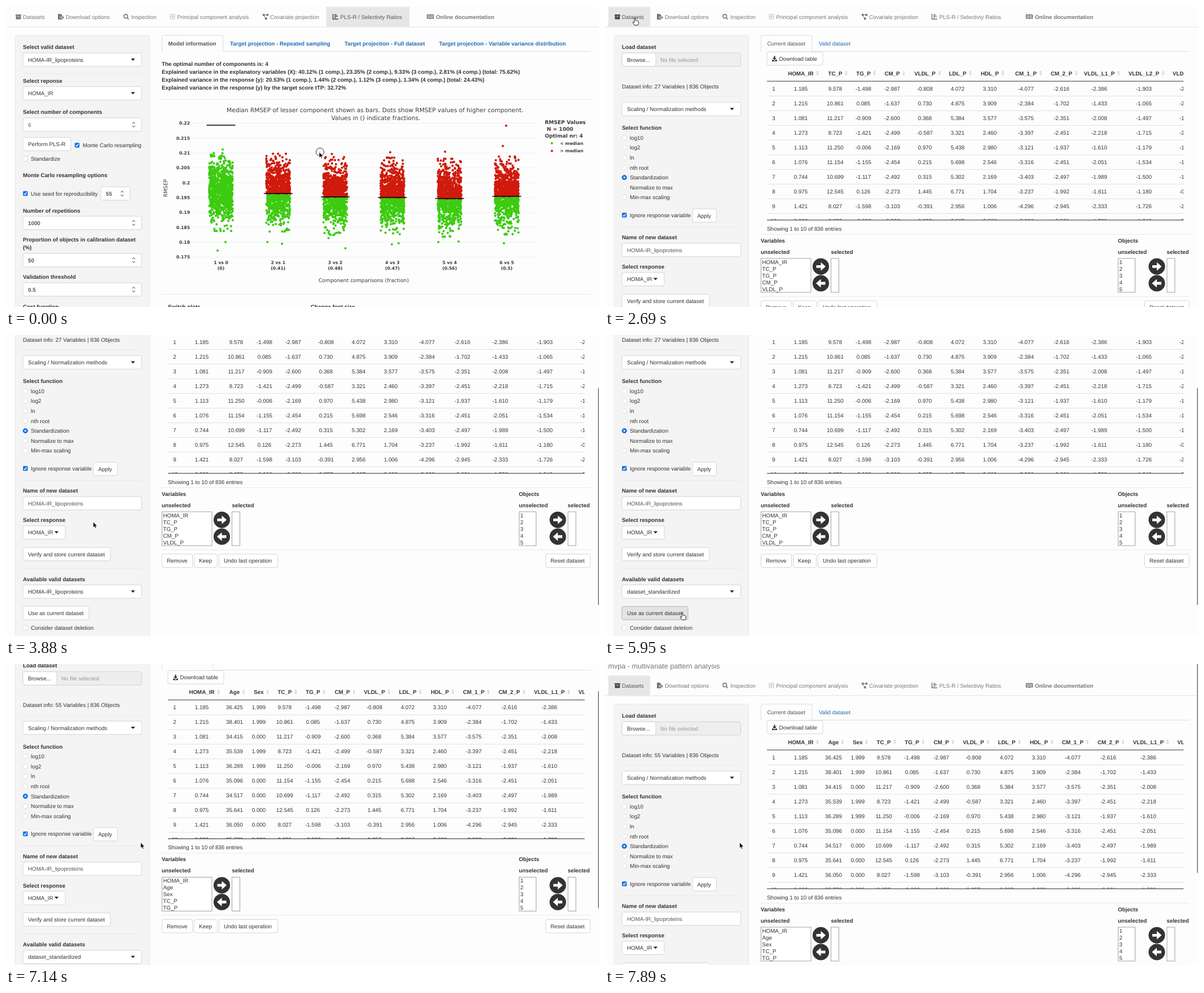
Write an HTML page that moves like this. It is 1051 px wide and 533 px high and loops after 8000 ms.

```html
<!DOCTYPE html>
<html lang="en">
<head>
<meta charset="utf-8">
<title>mvpa</title>
<style>
html, body { margin: 0; width: 100%; height: 100%; overflow: hidden; background: #fdfdfd; }
svg { display: block; width: 1051px; height: 533px; }
text { font: 9.8px "Liberation Sans", Arial, sans-serif; fill: #333; text-rendering: geometricPrecision; white-space: pre; }
.b { font-weight: bold; }
.m { text-anchor: middle; }
.nav { fill: #777; }
.on { fill: #555; }
.link { fill: #1f6db5; }
.field { fill: #555; }
.mute { fill: #999; }
.inv { fill: #fff; }
.plot text { font-family: "DejaVu Sans", Verdana, sans-serif; fill: #3a3a3a; }
.plot .tick { font-size: 7.7px; font-weight: bold; }
.plot .axis { font-size: 9.2px; }
.plot .title { font-size: 10.6px; }
.plot .legend { font-size: 9.1px; font-weight: bold; }
.end { text-anchor: end; }
</style>
</head>
<body>
<svg id="stage" viewBox="0 0 1051 533" xmlns="http://www.w3.org/2000/svg"></svg>
<script>
const FRAME = 148.8, LOOP = 8000;
const GREEN = '#3ccb10', RED = '#cf1a0c';
const range = n => [...Array(n).keys()];
const join = list => list.join('');

// Text is placed by the vertical centre of its capitals.
const text = (x, y, s, cls = '', extra = '') =>
  `<text x="${x}" y="${y}" dy=".36em" class="${cls}" ${extra}>${s.replace(/</g, '&lt;').replace(/>/g, '&gt;')}</text>`;
const bold = (x, y, s, cls = '') => text(x, y, s, 'b ' + cls);
const rect = (x, y, w, h, fill, stroke = 'none', r = 0, extra = '') =>
  `<rect x="${x}" y="${y}" width="${w}" height="${h}" rx="${r}" fill="${fill}" stroke="${stroke}" stroke-width=".8" ${extra}/>`;
const path = (d, fill = 'none', stroke = 'none', w = 1, extra = '') =>
  `<path d="${d}" fill="${fill}" stroke="${stroke}" stroke-width="${w}" ${extra}/>`;
const rule = (x1, x2, y, color = '#e9e9e9', w = 1) => path(`M${x1} ${y}H${x2}`, 'none', color, w);
const at = (x, y, body, extra = '') => `<g transform="translate(${x} ${y})" ${extra}>${body}</g>`;
const caret = (x, y) => path(`M${x - 3.7} ${y - 2}h7.4l-3.7 4z`, '#222');
const box = (x, w, y, fill = '#fff') => rect(x, y - 11.8, w, 23.6, fill, '#ccc', 2.8);
const button = (x, w, y, label, tx = x + 9) => box(x, w, y) + text(tx, y, label);
const select = (y, label, cls = '') => box(30, 210.5, y) + text(39, y, label, cls) + caret(225, y);
const number = (x, w, y, value, cls) => box(x, w, y) + text(x + 9, y, value, 'field ' + cls) +
  path(`M${x + w - 16.5} ${y - 1.6}l2.3-3 2.3 3m-4.6 3.4l2.3 3 2.3-3`, 'none', '#444', 1);
const check = (x, y, on) => on
  ? rect(x - 4.2, y - 4.2, 8.4, 8.4, '#1173e6', 'none', 1.6) + path(`M${x - 2.2} ${y}l1.6 2 3-4.2`, 'none', '#fff', 1.3)
  : rect(x - 4.2, y - 4.2, 8.4, 8.4, '#fff', '#d4d4d4', 1.6);
const radio = (y, on) => `<circle cx="34.3" cy="${y}" r="4.2" fill="${on ? '#1173e6' : '#fff'}" stroke="${on ? '#1173e6' : '#d4d4d4'}" stroke-width=".8"/>` +
  (on ? `<circle cx="34.3" cy="${y}" r="1.6" fill="#fff"/>` : '');
const tabs = width => rule(276, 1036, 80.3, '#ddd') +
  path(`M276.5 80.8V55q0-3 3-3h${width - 6}q3 0 3 3V80.8`, '#fdfdfd', '#ddd');
const sidebar = rect(16.5, 52, 238, 760, '#f4f4f4', '#e3e3e3', 3);

const ICONS = {
  archive: path('M-5-4H5v2.4H-5zM-4.4-1H4.4V4.4H-4.4zM-1.5 0v1h3v-1z', 'currentColor', 'none', 0, 'fill-rule="evenodd"'),
  export: path('M-5-5H0L2.5-2.5V5H-5z', 'currentColor') + path('M-2 1.3H4.6M2.6-.9L5 1.3 2.6 3.5', 'none', '#fdfdfd', 2.6) +
    path('M-2 1.3H5M3-.9L5.2 1.3 3 3.5', 'none', 'currentColor', 1.2),
  search: path('M1.7 1.7L4.6 4.6M2.6-.8a3.3 3.3 0 1 1-6.6 0a3.3 3.3 0 1 1 6.6 0', 'none', 'currentColor', 1.6),
  table: path('M-4-4H4V4H-4zM-4 0H4M0-4V4', 'none', '#aaa', 1, 'stroke-dasharray="1.4 .6"'),
  diagram: path('M-5-5h3.6v3.6H-5zM1.6-5h3.6v3.6H1.6zM-1 1.6h3.6v3.6H-1z', 'currentColor') + path('M-2-3.2H2M-3-2L0 2.6', 'none', 'currentColor', 1),
  chart: path('M-4.5-5V4.2H5', 'none', 'currentColor', 1.5) + path('M-2-3.5H2M-2-1H4M-2 1.5H1', 'none', 'currentColor', 1.3),
  book: path('M-5.5-3.4Q-2.5-4.6 0-3Q2.5-4.6 5.5-3.4V3.2Q2.5 2 0 3.6Q-2.5 2-5.5 3.2z', '#ddd', '#444', 1) + path('M0-3V4M-4-1.5h2.6M-4 .5h2.6M1.4-1.5H4M1.4.5H4', 'none', '#555', .8)
};
const NAV = [['archive', 22, 30, 'Datasets'], ['export', 97, 106, 'Download options'], ['search', 213, 222, 'Inspection'],
  ['table', 295, 303.5, 'Principal component analysis'], ['diagram', 460, 468, 'Covariate projection'],
  ['chart', 584, 592.5, 'PLS-R / Selectivty Ratios'], ['book', 752, 762, 'Online documentation']];
const nav = (active, x, w) => rule(0, 1051, 37, '#e2e2e2') + rect(x, 1.5, w, 35.3, '#e6e6e6') +
  join(NAV.map(([icon, ix, tx, label], i) => `<g ${i ? '' : 'class="first"'}>` +
    at(ix, 19, ICONS[icon], `color="${i === active ? '#444' : '#777'}"`) +
    text(tx, 19, label, (i === active ? 'on' : 'nav') + (i === 6 ? ' b' : '')) + '</g>'));

// Model page
function scatter() {
  let seed = 7;
  const random = () => (seed = (seed * 16807) % 2147483647) / 2147483647;
  const normal = () => Math.sqrt(-2 * Math.log(random())) * Math.cos(2 * Math.PI * random());
  const lines = [211, 332, 338, 339, 341, 337];
  const strays = [[3, 254, 8, 418, -6, 433], [3, 265, -19, 418, 7, 421], [-6, 262, 18, 429, -12, 411],
    [-4, 259, -1, 422, 11, 420], [-8, 258, -35, 418, 16, 417], [-1, 212, -7, 248, -5, 420]];
  let green = '', red = '', bars = '';
  lines.forEach((line, i) => {
    const cx = 381 + 101.3 * i, mean = i ? line - 4 : 327;
    const dot = (x, y) => {
      const d = `M${(cx + x).toFixed(1)} ${y.toFixed(1)}h0`;
      if (i && y < line) red += d; else green += d;
    };
    range(1000).forEach(() => dot((random() - .5) * 42, mean + 25.5 * Math.max(-2.6, Math.min(2.8, normal()))));
    range(3).forEach(n => dot(Math.max(-20, strays[i][2 * n]), strays[i][2 * n + 1]));
    bars += rule(cx - 25.5, cx + 25.5, line, '#000', 1.6);
  });
  const round = 'stroke-linecap="round"';
  return path(green, 'none', GREEN, 4.2, round) + path(red, 'none', RED, 4.2, round) + bars;
}
const ticks = ['0.22', '0.215', '0.21', '0.205', '0.2', '0.195', '0.19', '0.185', '0.18', '0.175'];
const shares = ['0', '0.41', '0.48', '0.47', '0.56', '0.5'];
const plot = `<g class="plot">` +
  join(ticks.map((s, i) => rule(330, 942, 207.5 + 26.35 * i, '#eee', .8) + text(326, 207.5 + 26.35 * i, s, 'tick end'))) +
  scatter() +
  text(654, 184.5, 'Median RMSEP of lesser component shown as bars. Dots show RMSEP values of higher component.', 'title m') +
  text(655.5, 198.5, 'Values in () indicate fractions.', 'title m') +
  join(shares.map((s, i) => text(381 + 101.3 * i, 454, `${i + 1} vs ${i}`, 'tick m') + text(381 + 101.3 * i, 464, `(${s})`, 'tick m'))) +
  text(634, 485.5, 'Component comparisons (fraction)', 'axis m') +
  at(283, 322.5, text(0, 0, 'RMSEP', 'axis m', 'transform="rotate(-90)"')) +
  text(955, 206, 'RMSEP Values', 'legend') + text(958.5, 218, 'N = 1000', 'legend') + text(955, 230, 'Optimal nr: 4', 'legend') +
  `<circle cx="967.5" cy="243" r="2.1" fill="${GREEN}"/><circle cx="967.5" cy="256.5" r="2.1" fill="${RED}"/>` +
  text(982, 243, '< median', 'tick') + text(982, 256.5, '> median', 'tick') + '</g>';

const modelPage = nav(5, 567.5, 147.5) + sidebar +
  bold(30, 72, 'Select valid dataset') + select(95, 'HOMA-IR_lipoproteins') +
  rule(30, 241, 120) + bold(30, 132, 'Select reponse') + select(154.5, 'HOMA_IR') +
  bold(30, 187.5, 'Select number of components') + number(30, 210.5, 210, '6', '') +
  button(30, 85, 244.5, 'Perform PLS-R') + check(126, 246.5, true) + text(136, 246.5, 'Monte Carlo resampling') +
  check(34.3, 270.5, false) + text(44, 270.5, 'Standardize') +
  bold(30, 299, 'Monte Carlo resampling options') +
  check(34.3, 332, true) + text(44, 332, 'Use seed for reproducibility') + number(168, 52, 332, '55', 'b') +
  bold(30, 362, 'Number of repetitions') + number(30, 210.5, 384, '1000', 'b') +
  bold(30, 413.5, 'Proportion of objects in calibration dataset') + bold(30, 427.5, '(%)') + number(30, 210.5, 450, '50', 'b') +
  bold(30, 479.5, 'Validation threshold') + number(30, 210.5, 502, '0.5', 'b') + bold(30, 532, 'Cost function') +
  tabs(108) + bold(287.5, 66, 'Model information', 'on') + bold(397, 66, 'Target projection - Repeated sampling', 'link') +
  bold(600, 66, 'Target projection - Full dataset', 'link') + bold(767.5, 66, 'Target projection - Variable variance distribution', 'link') +
  bold(276, 102, 'The optimal number of components is: 4') +
  bold(276, 116, 'Explained variance in the explanatory variables (X): 40.12% (1 comp.), 23.35% (2 comp.), 9.33% (3 comp.), 2.81% (4 comp.) (total: 75.62%)') +
  bold(276, 130, 'Explained variance in the response (y): 20.53% (1 comp.), 1.44% (2 comp.), 1.12% (3 comp.), 1.34% (4 comp.) (total: 24.43%)') +
  bold(276, 144, 'Explained variance in the response (y) by the target score tTP: 32.72%') +
  rule(276, 1036, 165.5) + plot + rule(276, 1036, 510.5) + bold(287, 532, 'Switch plots') + bold(540, 532, 'Change font size');

// Dataset page
const HEAD = 'HOMA_IR Age Sex TC_P TG_P CM_P VLDL_P LDL_P HDL_P CM_1_P CM_2_P VLDL_L1_P VLDL_L2_P'.split(' ');
const ROWS = [
  '1.185 36.425 1.999 9.578 -1.498 -2.987 -0.808 4.072 3.310 -4.077 -2.616 -2.386 -1.903',
  '1.215 38.401 1.999 10.861 0.085 -1.637 0.730 4.875 3.909 -2.384 -1.702 -1.433 -1.065',
  '1.081 34.415 0.000 11.217 -0.909 -2.600 0.368 5.384 3.577 -3.575 -2.351 -2.008 -1.497',
  '1.273 35.539 1.999 8.723 -1.421 -2.499 -0.587 3.321 2.460 -3.397 -2.451 -2.218 -1.715',
  '1.113 36.289 1.999 11.250 -0.006 -2.169 0.970 5.438 2.980 -3.121 -1.937 -1.610 -1.179',
  '1.076 35.096 0.000 11.154 -1.155 -2.454 0.215 5.698 2.546 -3.316 -2.451 -2.051 -1.534',
  '0.744 34.517 0.000 10.699 -1.117 -2.492 0.315 5.302 2.169 -3.403 -2.497 -1.989 -1.500',
  '0.975 35.641 0.000 12.545 0.126 -2.273 1.445 6.771 1.704 -3.237 -1.992 -1.611 -1.180',
  '1.421 36.050 0.000 8.027 -1.598 -3.103 -0.391 2.956 1.006 -4.296 -2.945 -2.333 -1.726',
  '0.989 35.770 0.000 9.055 -0.909 -2.290 0.257 3.867 2.600 -3.089 -2.021 -1.789 -1.240'].map(r => r.split(' '));
const CUT = '2212111022';
const pen = document.createElement('canvas').getContext('2d');
pen.font = 'bold 9.8px "Liberation Sans", Arial, sans-serif';

function table(columns, centres, edge) {
  const heads = columns.map((c, i) => {
    const x = centres[i], ax = x + pen.measureText(HEAD[c]).width / 2 + 7;
    return bold(x, 119, HEAD[c], 'm') + path(`M${ax - 2.4} 118l2.4-3.6 2.4 3.6zm0 1.6l2.4 3.6 2.4-3.6z`, '#d2d2d2');
  });
  const cells = ROWS.map((row, r) => text(299, 146 + 26 * r, `${r + 1}`, 'm') +
    join(columns.map((c, i) => text(centres[i], 146 + 26 * r, row[c], 'm'))) +
    (edge.cut ? text(1018, 146 + 26 * r, `-${CUT[r]}.1`) : ''));
  return `<g clip-path="url(#view)">${join(heads)}${bold(edge.x, 119, 'VLDL_L3_P')}${join(cells)}</g>` +
    join(range(9).map(r => rule(287, 1025.5, 159.5 + 26 * r, '#ddd', .9))) +
    rule(287, 1025.5, 133.2, '#333', 1) + rule(287, 1025.5, 379, '#222', 1.2);
}
const list = (x, w, items) => rect(x + .5, 447, w, 60, '#fff', '#8a8a8a') + join(items.map((s, i) => text(x + 2.5, 453.2 + 12 * i, s)));
const disc = (x, y, dir) => `<g transform="translate(${x} ${y}) scale(${dir} 1)"><circle r="14.6" fill="#333"/>` +
  path('M-8-2.4H0V-7.5L8.6 0 0 7.5V2.4H-8z', '#fff') + '</g>';
const variant = (id, vars, grid, names) => `<g id="${id}">` +
  text(30, 142, `Dataset info: ${vars} Variables | 836 Objects`) + grid + list(276, 88.5, names) + '</g>';
const without = HEAD.map((_, i) => i).filter(i => i !== 1 && i !== 2);
const methods = ['log10', 'log2', 'ln', 'nth root', 'Standardization', 'Normalize to max', 'Min-max scaling'];

const dataPage = text(5.5, -16, 'mvpa - multivariate pattern analysis', 'nav', 'style="font-size:12.6px"') +
  nav(0, 6, 74) + sidebar +
  bold(30, 72, 'Load dataset') + box(30, 210.5, 95, '#eee') + rect(30, 83.2, 60, 23.6, '#fff', '#ccc', 2.8) +
  text(39, 95, 'Browse...') + text(98, 95, 'No file selected', 'mute') +
  rule(30, 241, 160.5) + select(182.5, 'Scaling / Normalization methods') + bold(30, 215.5, 'Select function') +
  join(methods.map((s, i) => radio(233.2 + 17.6 * i, i === 4) + text(44, 233.2 + 17.6 * i, s))) +
  check(34.3, 370.3, true) + text(44, 370.3, 'Ignore response variable') + button(155, 42.5, 371, 'Apply', 163.5) +
  rule(30, 241, 391.5) + bold(30, 409.5, 'Name of new dataset') + box(30, 210.5, 432) + text(39, 432, 'HOMA-IR_lipoproteins', 'field') +
  bold(30, 461.5, 'Select response') + button(30, 75, 483.7, 'HOMA_IR') + caret(89.5, 483.5) +
  button(30, 155, 522, 'Verify and store current dataset') + rule(30, 241, 547.5) +
  bold(30, 566, 'Available valid datasets') +
  rect(29, 575.5, 212.5, 25.5, 'none', '#9fcdf2', 3.4, 'id="focus" style="stroke-width:2.4"') +
  select(588.3, 'HOMA-IR_lipoproteins', 'chosen') +
  `<g id="use">${button(30, 117, 626.5, 'Use as current dataset')}</g>` +
  check(34.3, 652.3, false) + text(44, 652.3, 'Consider dataset deletion') +
  `<g id="menu">${rect(29.5, 602.5, 213, 45, 'rgba(0,0,0,.08)', 'none', 3)}${rect(30, 600.5, 210.5, 44, '#fff', '#ccc', 2.8)}` +
  rect(30.5, 604, 209.5, 18.2, '#337ab7', 'none', 0, 'id="mark"') +
  text(39, 613.2, 'HOMA-IR_lipoproteins', 'option') + text(39, 631.4, 'dataset_standardized', 'option') + '</g>' +
  tabs(90.5) + text(287.5, 66, 'Current dataset', 'on') + text(379, 66, 'Valid dataset', 'link') +
  button(287, 99, 93, 'Download table', 308.5) +
  path('M299.4 88.5h2.2v3.6h2.6l-3.7 3.6-3.7-3.6h2.6zM296 95.3h2l2.5 2 2.5-2h2v2.7h-9z', '#333') +
  variant('small', 27, table(without, [347, 408, 458, 509, 567, 625, 682, 746, 809, 876, 955], {x: 1006, cut: true}),
    ['HOMA_IR', 'TC_P', 'TG_P', 'CM_P', 'VLDL_P']) +
  variant('large', 55, table(range(12), [347, 405, 448, 494, 544, 596, 653, 712, 769, 829, 892, 963], {x: 1014.5}),
    ['HOMA_IR', 'Age', 'Sex', 'TC_P', 'TG_P']) +
  text(287, 394, 'Showing 1 to 10 of 836 entries') + rule(276, 1036, 404.5) +
  bold(276, 415.3, 'Variables') + bold(909, 415.3, 'Objects') +
  join([276, 909].map(x => bold(x, 435, 'unselected'))) + join([400.5, 995.5].map(x => bold(x, 435, 'selected'))) +
  list(400, 14, []) + list(909, 30, ['1', '2', '3', '4', '5']) + list(995.5, 14, []) +
  join([382.5, 978].map(x => disc(x, 461.3, 1) + disc(x, 491, -1))) + rule(276, 1036, 514.3) +
  button(276.5, 54, 533.7, 'Remove', 285) + button(333.5, 41, 533.7, 'Keep', 342) +
  button(377.5, 104.5, 533.7, 'Undo last operation', 386) + button(956.5, 79, 533.7, 'Reset dataset', 965);

const stage = document.getElementById('stage');
stage.innerHTML = `<defs><clipPath id="view"><rect x="287" y="106" width="738.5" height="272.4"/></clipPath></defs>
  <g id="model">${modelPage}</g><g id="data">${dataPage}</g>
  ${rect(1049.3, 0, 3, 384, '#7c7c7c', 'none', 1, 'id="bar"')}
  <g id="pointer"><circle id="ring" cx="1.5" cy="0" r="7" fill="rgba(255,255,255,.35)" stroke="#222" stroke-width="1"/>
  ${path('M0 0V10.2L2.4 8L4 11.6L5.7 10.9L4.2 7.4H7.3Z', '#000', '#fff', .8, 'id="arrow"')}
  ${path('M-1 6.5V.8a1 1 0 0 1 2 0V4.5l4 .9q1.6.5 1.5 2V9.5L5.3 13H-.5L-3.6 8.4q-.5-1.4.9-1.2L-1 8.6Z', '#fff', '#111', .9, 'id="hand"')}</g>`;

const POINTER = [[3, 555, 258.5], [6, 177, 94], [9, 177, 94], [15, 53, 21], [19, 53, 21], [24, 154.5, 331], [27, 154.5, 331],
  [31, 146, 452], [33, 146, 456], [36, 142, 493], [37, 142, 493], [40, 137, 491.5], [43, 137, 491.5], [46, 238.5, 316]];
const SCROLL = [[21, 0], [26, 134], [46, 134], [50, 5], [53, -19]];
function follow(keys, k) {
  const i = keys.findIndex(key => key[0] >= k);
  if (i === 0) return keys[0].slice(1);
  if (i < 0) return keys[keys.length - 1].slice(1);
  const a = keys[i - 1], b = keys[i], u = (k - a[0]) / (b[0] - a[0]), e = u * u * (3 - 2 * u);
  return a.slice(1).map((v, n) => v + (b[n + 1] - v) * e);
}
const $ = id => document.getElementById(id);
const show = (id, on) => { $(id).style.display = on ? '' : 'none'; };
const within = (k, a, b) => k >= a && k <= b;
const hovered = stage.querySelector('#model .first'), chosen = stage.querySelector('.chosen');
const options = stage.querySelectorAll('.option'), useBox = stage.querySelector('#use rect');

function draw(k) {
  const [x, y] = follow(POINTER, k), [scroll] = follow(SCROLL, k);
  const hand = within(k, 14, 19) || within(k, 39, 43);
  $('pointer').setAttribute('transform', `translate(${x} ${y})`);
  show('arrow', !hand);
  show('hand', hand);
  show('ring', k === 0 || k === 17 || k === 42);
  show('model', k < 17);
  show('data', k >= 17);
  $('data').setAttribute('transform', `translate(0 ${-scroll})`);
  show('bar', k >= 22);
  $('bar').setAttribute('y', (scroll + 19) * .706 - 14);
  show('small', k < 44);
  show('large', k >= 44);
  hovered.querySelector('text').setAttribute('class', within(k, 14, 16) ? '' : 'nav');

  const second = k >= 35;
  show('menu', within(k, 32, 36));
  show('focus', within(k, 32, 38));
  $('mark').setAttribute('y', second ? 622.2 : 604);
  options.forEach((o, i) => o.setAttribute('class', i === +second ? 'option inv' : 'option'));
  chosen.textContent = k >= 37 ? 'dataset_standardized' : 'HOMA-IR_lipoproteins';
  const over = within(k, 39, 43);
  useBox.setAttribute('fill', over ? '#e4e4e4' : '#fff');
  useBox.setAttribute('stroke', over ? '#a5a5a5' : '#ccc');
}

let last = -1;
const start = performance.now();
function tick(now) {
  const k = Math.floor((Math.max(0, now - start) % LOOP + 8) / FRAME);
  if (k !== last) draw(last = k);
  requestAnimationFrame(tick);
}
tick(start);
</script>
</body>
</html>
```
